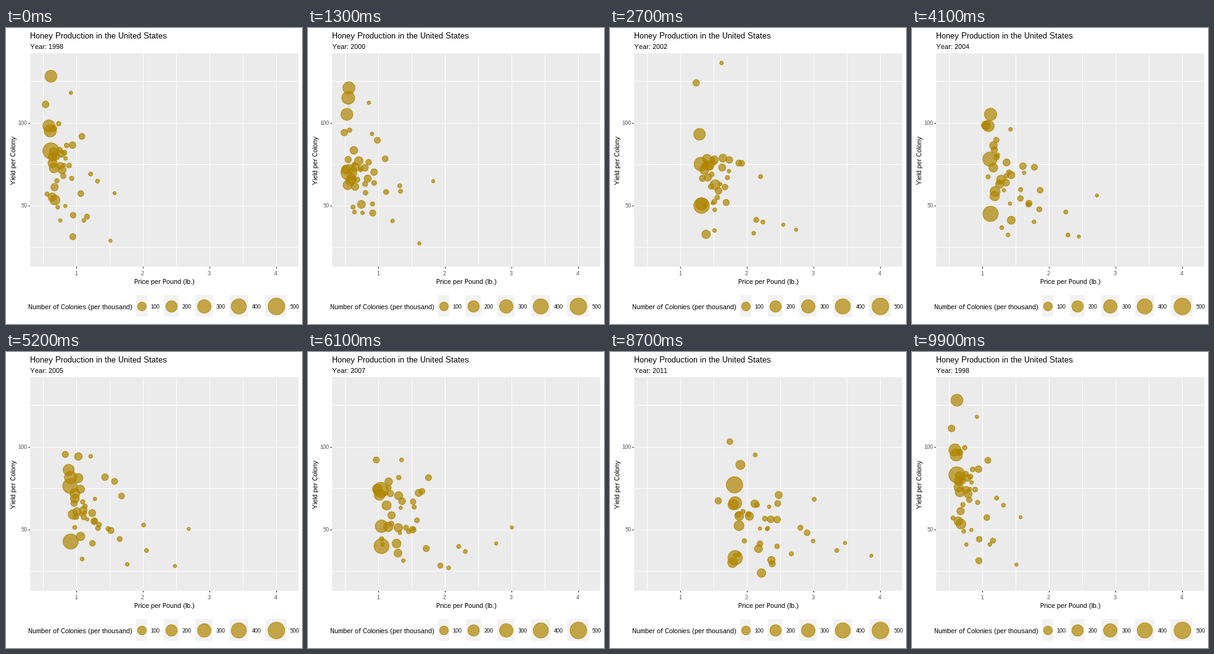
Recreate the animation shown at these times as a matplotlib script. Size 480 by 480 pixels, loop 10000 ms.

```python
import numpy as np
import matplotlib as mpl
import matplotlib.pyplot as plt
from matplotlib.animation import FuncAnimation
from matplotlib.colors import to_rgba
from matplotlib.patches import Rectangle

mpl.rcParams.update({
    "font.family": "Liberation Sans",
    "text.hinting": "native",
    "text.hinting_factor": 1,
})

SIZE, DPI = 480, 72
LEFT, TOP, RIGHT, BOTTOM = 39, 41, 474, 387
HONEY = "#AF8500"
YEARS = np.arange(1998, 2013)
FRAMES, MOVE = 100, 3

# Frame at which each year is reached: seven frames apart, later six.
ARRIVE = np.cumsum([0, 6] + [7] * 6 + [6] + [7] * 3 + [6] * 4)


def dot_size(colonies):
    return 1 + 11 * np.sqrt(np.clip(colonies - 2, 0, None) / 508)


def marker_area(size):
    return (0.75 * (size * 2.845 + 0.945) + 1) ** 2


def make_data(small=37):
    """Price, yield and dot size for every year and state."""
    rng = np.random.default_rng(12)
    n_years = len(YEARS)
    national = np.interp(YEARS, [1998, 2000, 2001, 2002, 2003, 2005, 2007, 2008, 2012],
                         [.65, .59, .70, 1.35, 1.39, .92, 1.08, 1.42, 2.0])

    # Small producers ask a premium that grows over time; yields fall slowly.
    rank = np.linspace(0, 1, small)
    premium = (1 - rank) * rng.random(small) ** 1.3
    premium[0] = 1
    growth = np.interp(YEARS, [1998, 2009], [.95, 2.05])
    price = national[:, None] * (1 + .07 * rng.normal(size=(n_years, small)))
    price = price + growth[:, None] * premium
    output = (np.linspace(69, 53, n_years)[:, None] + 18 * (rank - .5) - 12 * premium
              + 11 * rng.normal(size=small) + 10 * rng.normal(size=(n_years, small)))
    colonies = np.tile(4 * 35 ** rank, (n_years, 1))
    clouds = [np.stack([price, output, dot_size(colonies)], axis=2)]

    # Landmark states: yield at a few years, colonies at both ends, price offset.
    key_years = [1998, 2000, 2002, 2004, 2007, 2009]
    landmarks = [
        ([83, 70, 50, 45, 40, 33], 460, 350, -.03),
        ([95, 115, 75, 78, 74, 77], 235, 490, -.04),
        ([128, 121, 51, 105, 52, 66], 225, 270, -.03),
        ([98, 105, 93, 98, 71, 65], 235, 150, -.06),
        ([111, 94, 124, 98, 92, 103], 48, 30, -.11),
        ([118, 112, 136, 96, 92, 95], 5, 9, .27),
    ]
    for yields, first, last, offset in landmarks:
        track = [national + offset, np.interp(YEARS, key_years, yields),
                 dot_size(np.linspace(first, last, n_years))]
        clouds.append(np.stack(track, axis=1)[:, None])
    data = np.concatenate(clouds, axis=1)
    data[..., 0] = data[..., 0].clip(.49, 4.15)
    data[..., 1] = data[..., 1].clip(20, 136)
    return data


DATA = make_data()


def px(price):
    return LEFT + (price - 0.307) * 435 / 4.026


def py(output):
    return BOTTOM - (output - 13.15) * 346 / 128.7


fig = plt.figure(figsize=(SIZE / DPI, SIZE / DPI), dpi=DPI, facecolor="white")
ax = fig.add_axes([0, 0, 1, 1])
ax.set(xlim=(0, SIZE), ylim=(SIZE, 0))
ax.axis("off")


def box(x, y, w, h, color):
    ax.add_patch(Rectangle((x, y), w, h, facecolor=color, linewidth=0, antialiased=False))


def label(x, y, text, size, color="black", ha="left", **kw):
    return ax.text(x, y, text, fontsize=size, color=color, ha=ha, va="baseline",
                   rotation_mode="anchor", **kw)


def dots(x, y, size):
    return ax.scatter(x, y, s=marker_area(size), facecolors=[to_rgba(HONEY, .7)],
                      edgecolors=[to_rgba(HONEY, .85)], linewidths=1, zorder=3)


box(LEFT, TOP, RIGHT - LEFT, BOTTOM - TOP, "#EBEBEB")
for v in np.arange(0.5, 4.1, 0.5):
    x = round(px(v))
    box(x, TOP, 1, BOTTOM - TOP, "white")
    if v % 1 == 0:
        box(x, BOTTOM, 1, 3, "#333333")
        label(x - 0.5, 401, f"{v:.0f}", 9, "#4D4D4D", "center")
for v in range(25, 126, 25):
    y = round(py(v))
    box(LEFT, y, RIGHT - LEFT, 1, "white")
    if v % 50 == 0:
        box(LEFT - 3, y, 3, 1, "#333333")
        label(34.5, y + 3, str(v), 9, "#4D4D4D", "right")

label(39, 17, "Honey Production in the United States", 13)
subtitle = label(39, 34, "", 11)
label(256.5, 415, "Price per Pound (lb.)", 11, ha="center")
label(16, 214.5, "Yield per Colony", 11, ha="center", rotation=90)

label(36, 456, "Number of Colonies (per thousand)", 11)
key_x = 211.3
for n in range(100, 501, 100):
    size = dot_size(n)
    width = (size + 0.5) * 2.835
    box(key_x, 433, width, 35, "#F2F2F2")
    dots([key_x + width / 2], [450.5], size)
    label(key_x + width + 5.5, 455, str(n), 9)
    key_x += width + 26.8

cloud = dots([], [], np.array([]))


def draw(frame):
    k = np.searchsorted(ARRIVE, frame, side="right") - 1
    now, after = k % len(YEARS), (k + 1) % len(YEARS)
    t = 0
    if k + 1 < len(ARRIVE):
        t = max(0, 1 - (ARRIVE[k + 1] - frame) / MOVE)
    price, output, size = (DATA[now] + t * (DATA[after] - DATA[now])).T
    cloud.set_offsets(np.column_stack([px(price), py(output)]))
    cloud.set_sizes(marker_area(size), DPI)
    subtitle.set_text(f"Year: {YEARS[after if t > 0.5 else now]}")
    return cloud, subtitle


anim = FuncAnimation(fig, draw, frames=FRAMES, interval=100, repeat=True)
plt.show()
```
